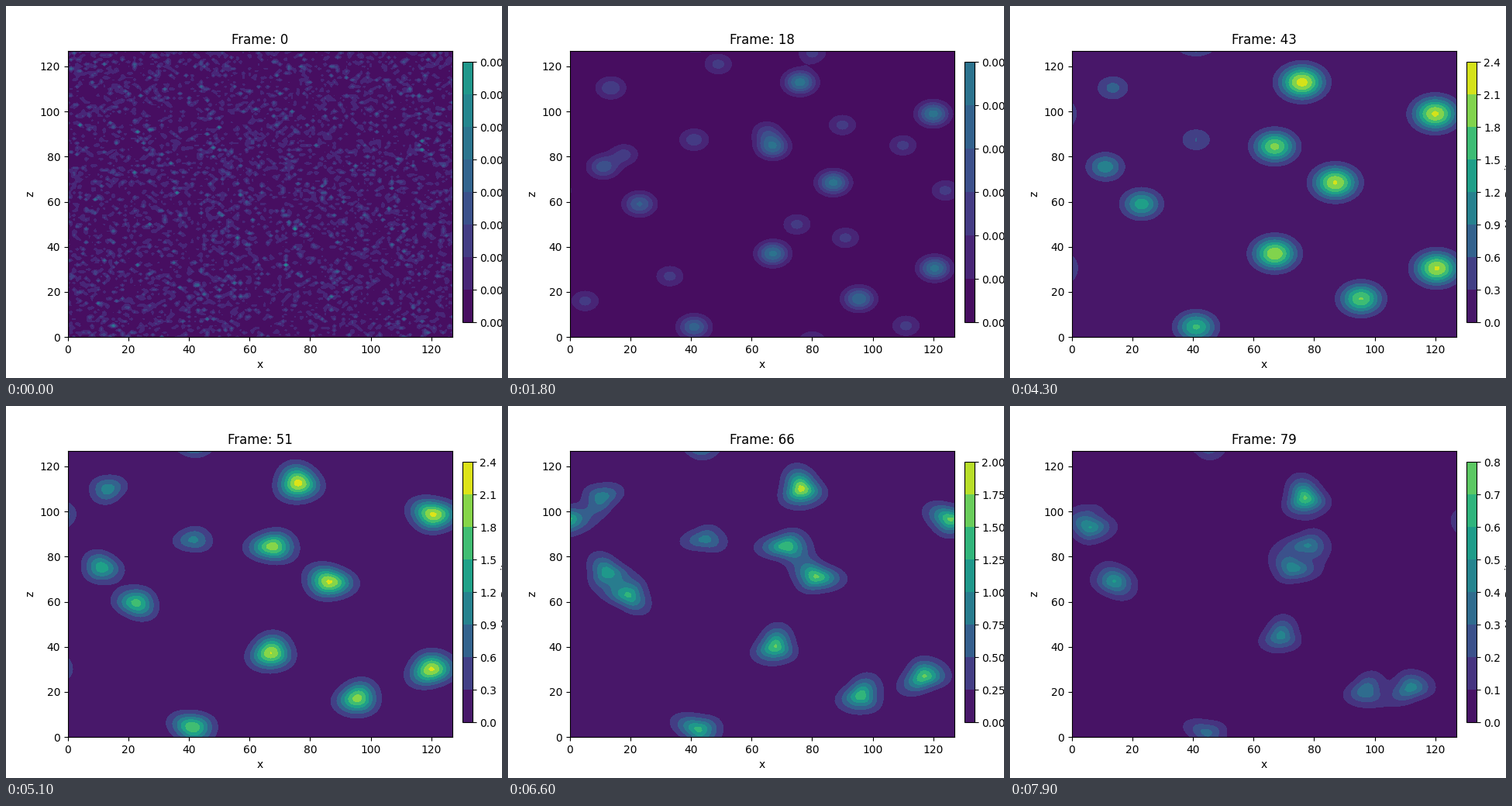
Animation of 640x480 px, one loop 8 s. Source, as a matplotlib script:

```python
import matplotlib.pyplot as plt
import numpy as np
from matplotlib.animation import FuncAnimation

N, FRAMES = 128, 80
Z, X = np.mgrid[0:N, 0:N]

rng = np.random.default_rng(4)
speckle = rng.exponential(size=(N, N))
speckle_hat = np.fft.fft2(speckle)
freq = np.fft.fftfreq(N)
freq2 = freq[:, None] ** 2 + freq[None, :] ** 2

# Lasting clumps: start x, z; end x, z; strength
CLUMPS = [
    (76, 113, 77, 106, 1.00), (120, 99, 134, 93, 0.96),
    (120.5, 30.5, 112, 22, 0.95), (87, 68.5, 73, 75, 0.95),
    (67, 37, 69, 45, 0.92), (67, 84.5, 78, 85, 0.84),
    (95.5, 17, 97, 20.5, 0.81), (41, 4.5, 44.5, 2, 0.69),
    (23, 59, 14, 68.5, 0.61), (11, 75.5, 14, 70, 0.48),
    (13.5, 110.5, 6, 100, 0.31), (41, 87.5, 50, 88, 0.27),
]
# Weak patches that vanish early
PATCHES = [(65, 91), (18, 81), (124, 65), (75, 50), (91, 44), (33, 27),
           (49, 121), (111, 5), (110, 85), (90, 94), (5, 16), (80, 126)]
LOBES = rng.uniform(0, 2 * np.pi, len(CLUMPS))


def ramp(k, a, b):
    return np.clip((k - a) / (b - a), 0, 1)


def wrap(d):
    return (d + N / 2) % N - N / 2


def clump(k, x0, z0, x1, z1, strength, lobe):
    late, move = ramp(k, 43, 59), ramp(k, 43, 79) ** 2
    height = strength ** np.interp(k, [18, 35, 43, 59, 79], [0.6, 1.4, 1, 0.25, 0.6])
    if strength < 1:
        height = max(0, height - 0.33 * ramp(k, 59, 74))

    # Settle to a strength-dependent width, then stretch along the drift
    grown = 3.3 + 1.5 * strength
    width = 3.5 + (grown - 3.5) * ramp(k, 18, 43)
    width += (4.1 - width) * late
    stretch = 1 + 0.14 * late
    tilt = np.arctan2(z1 - z0, x1 - x0)

    dx = wrap(X - x0 - (x1 - x0) * move)
    dz = wrap(Z - z0 - (z1 - z0) * move)
    angle = np.arctan2(dz, dx)
    r = np.hypot(dx, dz) / width
    r2 = r ** 2 * ((np.cos(angle - tilt) / stretch) ** 2
                   + (np.sin(angle - tilt) * stretch) ** 2)
    r2 *= 1 + 0.2 * late * np.cos(3 * angle + lobe)
    return height * np.exp(-(r2 / 2) ** (1 - 0.2 * late))


def clump_field(k):
    f = sum(clump(k, *c, lobe) for c, lobe in zip(CLUMPS, LOBES))
    fade = 0.42 * (1 - ramp(k, 18, 33))
    if fade > 0:
        for x, z in PATCHES:
            f = f + fade * np.exp(-(wrap(X - x) ** 2 + wrap(Z - z) ** 2) / 22)
    return f / f.max()


def noise_field(k):
    if k == 0:
        return speckle / speckle.max()
    blur = np.exp(-2 * np.pi ** 2 * 0.8 * k * freq2)
    f = np.fft.ifft2(speckle_hat * blur).real
    f = np.clip(f - f.mean(), 0, None)
    return (f / f.max()) ** 1.3


def peak(k):
    t = [0, 3, 8, 18, 35, 43, 62, 72, 79]
    p = [0.0078, 0.0028, 0.0028, 0.0084, 0.148, 2.25, 2.2, 1.45, 0.73]
    return np.exp(np.interp(k, t, np.log(p)))


def headroom(k):
    return np.interp(k, [0, 18, 35, 43, 54, 59, 72, 79],
                     [1.82, 2.58, 2.06, 1.067, 1.067, 1.165, 1.10, 1.37])


def field(k):
    w = 1 - ramp(k, 0, 18) ** 1.5
    f = (1 - w) * clump_field(k)
    if w > 0:
        f = f + w * noise_field(k)
    return f * (peak(k) / f.max())


fig, ax = plt.subplots(figsize=(6.4, 4.8), dpi=100)
ax.set_xlabel("x")
ax.set_ylabel("z")
title = ax.set_title("")
drawn = []


def update(k):
    while drawn:
        drawn.pop().remove()
    cs = ax.contourf(field(k), vmin=0, vmax=headroom(k) * peak(k))
    cax = fig.add_axes([0.92, 0.15, 0.02, 0.7])
    fig.colorbar(cs, cax=cax, label="Mass Density")
    title.set_text(f"Frame: {k}")
    drawn.extend([cs, cax])
    return drawn


anim = FuncAnimation(fig, update, frames=FRAMES, interval=100,
                     init_func=lambda: [], repeat=True, repeat_delay=0)
plt.show()
```
